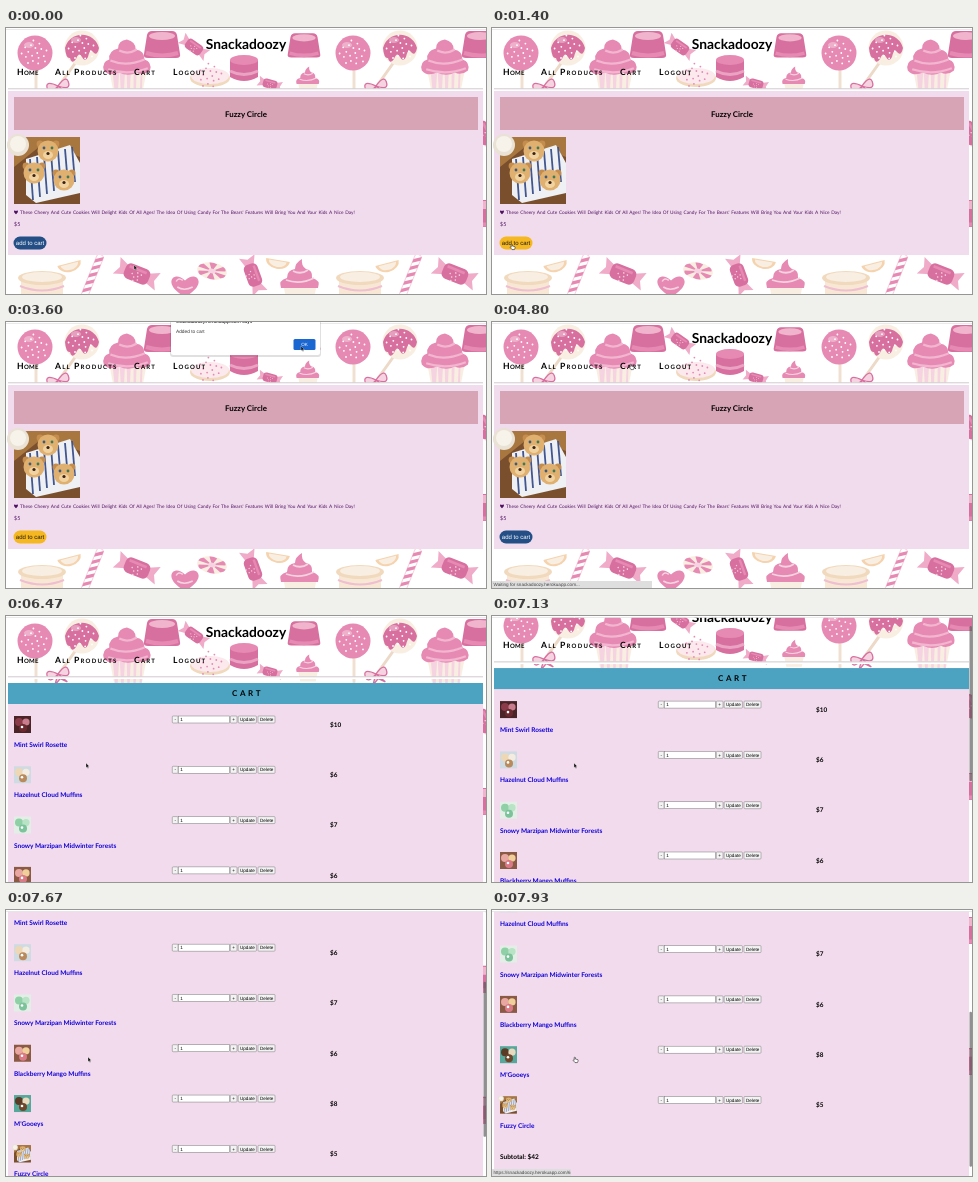
These frames come from a looping animation (480 by 266 pixels, 8 s). An HTML page:

```html
<!DOCTYPE html>
<html lang="en">
<head>
<meta charset="utf-8">
<title>Sweet shop</title>
<style>
html, body { margin: 0; width: 100%; height: 100%; overflow: hidden; background: #fff; }
svg { display: block; width: 480px; height: 266px; }
text { text-rendering: geometricPrecision; white-space: pre; }
.hand { font-family: Lato, sans-serif; font-weight: 700; }
.nav { font-size: 8.6px; font-variant: small-caps; }
.ui { font-family: "Liberation Sans", Arial, sans-serif; }
.body { font-family: Lato, sans-serif; fill: #4f1263; }
</style>
</head>
<body>
<svg id="stage" viewBox="0 0 480 266" xmlns="http://www.w3.org/2000/svg"></svg>
<script>
const stage = document.getElementById('stage');
const PINK = '#e68ab3', DEEP = '#d8709f', PALE = '#f6d3e1', CREAM = '#f9eee2', PEACH = '#f1d9bd', CARD = '#f1dced';
const SITE = 'snackadoozy.herokuapp.com';
const PERIOD = 318;

const rect = (x, y, w, h, fill, more = '') =>
  `<rect x="${x}" y="${y}" width="${w}" height="${h}" fill="${fill}" ${more}/>`;
const circle = (x, y, r, fill) => `<circle cx="${x}" cy="${y}" r="${r}" fill="${fill}"/>`;
const oval = (x, y, rx, ry, fill) => `<ellipse cx="${x}" cy="${y}" rx="${rx}" ry="${ry}" fill="${fill}"/>`;
const path = (d, fill, more = '') => `<path d="${d}" fill="${fill}" ${more}/>`;
const line = (d, color, width = 1) => path(d, 'none', `stroke="${color}" stroke-width="${width}"`);
const at = (x, y, body, rot = 0, scale = 1) =>
  `<g transform="translate(${x} ${y}) rotate(${rot}) scale(${scale})">${body}</g>`;
const text = (x, y, size, cls, str, more = '') =>
  `<text x="${x}" y="${y}" font-size="${size}" class="${cls}" ${more}>${str}</text>`;
const group = (id, body, more = '') => `<g id="${id}" ${more}>${body}</g>`;
const repeat = (n, fn) => Array.from({ length: n }, (_, i) => fn(i)).join('');

// Sweets of the wallpaper, each drawn around its own centre
const dots = (n, r, fill) => repeat(n, i => {
  const a = i * 2.4, d = r * Math.sqrt((i + .5) / n) * .85;
  return circle((Math.cos(a) * d).toFixed(1), (Math.sin(a) * d).toFixed(1), .9, fill);
});
const ball = (fill, speck, drip) => circle(0, 0, 17.5, fill) +
  (drip ? path('M-17 0a17.5 17.5 0 0 1 34 0q-2 9-6 4q-3-4-5 5q-3 6-6 0q-3-6-6 2q-4 6-6-1q-4 1-5-10z', drip) : '') +
  oval(-6, -8, 5, 3, '#ffffff55') + dots(18, 16, speck);
const cupcake = path('M-17 4L-12 30H12L17 4z', CREAM) +
  repeat(5, i => path(`M${-14 + i * 6.4} 4l${2.4 - i * .9} 26h2l${1.6 - i * .2} -26z`, PALE)) +
  path('M-22 4q-2-8 5-10q-1-8 8-10q0-7 8-8q8 2 8 9q8 1 8 9q7 2 5 10q-6 5-12 2q-8 4-16 0q-9 4-14-2z', PINK) +
  line('M-16-5q14 6 31-1M-8-14q8 4 16-1M-18 3q18 6 36-1', '#f3b6d0', 2);
const gum = path('M-18 10l3-19q1-4 5-4h20q4 0 5 4l3 19q1 4-4 4h-28q-5 0-4-4z', DEEP) +
  oval(0, -8, 13, 4, '#f0b4cd') + line('M-16 9q16 5 32 0', PINK, 4);
const drum = path('M-14-8v17q14 8 28 0v-17z', DEEP) + oval(0, -8, 14, 5, PINK) + line('M-14 3q14 7 28 0', '#eaa3c3', 3);
const wrapped = path('M-9-4L-20-9L-17 0L-21 8L-9 4zM9-4L20-9L17 0L21 8L9 4z', '#f0abc8') +
  rect(-12, -7.5, 24, 15, DEEP, 'rx="5"') + line('M-9-4h17', PINK, 2.5) + at(0, 2, dots(7, 8, PALE), 0, .8);
const heart = path('M0 9C-22-3-10-16 0-6C10-16 22-3 0 9z', PINK) + line('M-8-5q2-4 6-1M-7 0q6 4 14 0', PALE, 1.4);
const mint = oval(0, 0, 15, 8.5, CREAM) +
  repeat(6, i => `<g transform="scale(1 .57) rotate(${i * 60})">${path('M0 0L-4-14Q0-16 4-13z', PINK)}</g>`) +
  oval(0, 0, 4, 2.4, PALE);
const bow = path('M0 0Q-12-10-11 1Q-10 7 0 0Q12-10 11 1Q10 7 0 0L7 10L1 5L-6 10z', PALE, `stroke="${DEEP}" stroke-width="1.3"`);
const jar = path('M-21 0v20h42V0z', '#f8e7d4') + oval(0, 0, 24, 7, PEACH) + oval(0, -1, 20, 5, CREAM) +
  line('M-22 8q22 9 44 0', '#eebfd0', 2);
const cane = rect(-3.5, -24, 7, 48, '#fff', `rx="3" stroke="${PALE}"`) +
  repeat(6, i => path(`M-3.5 ${-18 + i * 8}l7-5v4l-7 5z`, PINK));
const slice = path('M-12 0a12 9 0 0 0 24 0z', '#f5d3ae') + path('M-9 1a9 6 0 0 0 18 0z', CREAM);
const meringue = path('M-19 10q-3-8 6-10q0-8 8-9q0-6 7-10q-1 7 4 10q7 1 6 9q9 2 6 10z', PINK) +
  line('M-14 2q14 5 28-2M-7-7q8 4 15-1', PALE, 1.8) + path('M-16 10L-13 26H13L16 10z', CREAM);
const loaf = oval(0, 0, 20, 9, PEACH) + oval(0, -2, 19, 8, '#fbe9ee') + at(0, -2, dots(16, 15, PINK)) ;

const topRow = line('M30 38V90', '#f0e0d2', 3) + line('M70 34L50 62', '#ecd9c8', 3) + at(52, 58, bow, -15) +
  at(29, 25, ball(PINK, '#fff')) + at(76, 20, ball(CREAM, '#fff', DEEP)) +
  at(122, 38, cupcake, 0, 1.1) + at(156, 16, gum) + at(188, 19, wrapped, 35, .75) + at(204, 50, loaf) +
  at(238, 40, drum) + at(298, 17, gum, 0, .9) + at(302, 50, meringue, 0, .6) + at(264, 56, wrapped, 15, .6);
const lowRow = at(36, 250, jar) + at(63, 235, slice, -15) + at(86, 249, cane, 22) + at(131, 246, wrapped, 22, 1.08) +
  at(179, 259, heart, 0, 1.1) + at(206, 243, mint, 10) + at(247, 247, wrapped, 70, .95) + at(272, 232, slice, 10) +
  at(294, 250, meringue);
const tile = topRow + lowRow + at(0, 300, topRow) + at(160, 105, wrapped, 60) + at(160, 185, gum);

// Product pictures
const bear = (x, y) => at(x, y, circle(-8, -7, 3.4, '#c48d4e') + circle(8, -7, 3.4, '#c48d4e') +
  circle(0, 0, 10.5, '#dfb06f') + oval(0, 4, 5, 4, '#f0d3a0') + circle(0, 2.5, 1.6, '#3a2216') +
  circle(-4, -3, 1.4, '#3d5a7a') + circle(4, -3, 1.4, '#3d7a5a'));
const photo = rect(0, 0, 66, 67, '#7a4f2d') + path('M0 0h66v20L30 6L0 30z', '#a8763f') +
  path('M12 22L56 8L66 26V56L22 66L12 58z', '#eef0f4') +
  repeat(7, i => line(`M${16 + i * 7} ${22 - i * 2}l3 ${41 - i}`, '#41558f', 1.8)) +
  circle(4, 8, 11, '#e9e2d5') + circle(4, 7, 8, '#f7f3ea') + bear(34, 14) + bear(20, 36) + bear(50, 43);
const thumb = (bg, a, b, c) => rect(0, 0, 17, 17, bg) + circle(5, 6, 4, a) + circle(12, 6, 3.6, b) +
  circle(9, 12, 4, c) + circle(8, 11, 1.3, '#fff');

const items = [
  ['Mint Swirl Rosette', 10, thumb('#4a2426', '#8b3b4a', '#c97c8e', '#6b2a30')],
  ['Hazelnut Cloud Muffins', 6, thumb('#cfdbe2', '#eed7b4', '#f4ece0', '#b98a5c')],
  ['Snowy Marzipan Midwinter Forests', 7, thumb('#e3efe6', '#8fd0a6', '#b8e3c4', '#7cc29a')],
  ['Blackberry Mango Muffins', 6, thumb('#8b5a45', '#e8a7a0', '#f1cf9a', '#d97a86')],
  ["M'Gooeys", 8, thumb('#56a89a', '#5b3a26', '#e9d9bd', '#6f472c')],
  ['Fuzzy Circle', 5, at(0, 0, photo, 0, .256)]
];

const box = (x, y, w, label, tx) => rect(x, y, w, 7, '#f3f3f3', 'rx=".8" stroke="#777" stroke-width=".5"') +
  text(tx, y + 5.2, 4.6, 'ui', label);
const row = ([name, price, pic], i) => at(0, i * 50.3,
  at(8, 100, pic) + text(8, 131, 6.5, 'hand', name, 'fill="#1100d8"') +
  box(166.3, 100, 5.7, '-', 168.4) + rect(172.3, 100, 51.4, 7, '#fff', 'stroke="#777" stroke-width=".5"') +
  text(174.3, 105.2, 4.6, 'ui', '1') + box(224.3, 100, 6.7, '+', 226.3) +
  box(232.2, 100, 18.2, 'Update', 234) + box(252, 100, 17, 'Delete', 254) +
  text(324, 110.8, 6.4, 'hand', '$' + price));

const nav = [['Home', 11, .3], ['All Products', 49, 1.2], ['Cart', 128, 1.2], ['Logout', 167, 1.1]]
  .map(([s, x, gap]) => text(x, 47, 8.6, 'hand nav', s, `letter-spacing="${gap}"`)).join('');

const product = rect(2, 63, 475, 164, CARD) + rect(8, 69, 464, 33, '#d6a4b5') +
  text(240, 88.6, 7.9, 'hand', 'Fuzzy Circle', 'text-anchor="middle"') + at(8, 109, photo) +
  path('M10 186.2C6.5 183.4 8.4 181.4 10 183C11.6 181.4 13.5 183.4 10 186.2z', '#4f1263') +
  text(14, 186, 4.75, 'body', "These Cheery And Cute Cookies Will Delight Kids Of All Ages! The Idea Of Using Candy For " +
    "The Bears' Features Will Bring You And Your Kids A Nice Day!", 'word-spacing=".6"') +
  text(8, 197.8, 5.4, 'body', '$5') +
  rect(7.5, 208.5, 33, 13, '#234f86', 'rx="6.5" id="pill"') +
  text(24, 217.2, 6, 'ui', 'add to cart', 'text-anchor="middle" id="label"');

const cart = rect(2, 67, 475, 400, '#f2dbed') + rect(2, 67, 475, 21, '#4ba3c1') +
  text(226, 80.2, 8, 'hand', 'CART', 'letter-spacing="2.6"') + items.map(row).join('') +
  text(8, 414.3, 6.5, 'hand', 'Subtotal: $42');

const alertBox = rect(164, -4, 151, 39, '#000', 'rx="3" opacity=".12"') + rect(165, -5, 149, 38, '#fff', 'rx="2.5"') +
  text(170, 1.2, 5, 'ui', SITE + ' says') + text(170, 10.6, 4.8, 'ui', 'Added to cart', 'fill="#333"') +
  rect(287.5, 17, 22, 11, '#1b67d2', 'rx="1.5"') +
  text(298.5, 24.3, 4.6, 'ui', 'OK', 'fill="#fff" text-anchor="middle"');

const arrow = path('M0 0V4.8L1.1 3.8L1.9 5.5L2.7 5.1L1.9 3.5H3.4z', '#111', 'stroke="#fff" stroke-width=".3"');
const hand = path('M.2.4Q.9-.4 1.3.5V2L3.8 2.6Q4.3 3 4 4.2L3.4 5.6H1L-.8 3.4Q-.6 2.6.2 3.2z', '#fff',
  'stroke="#111" stroke-width=".55"');

stage.innerHTML = rect(0, 0, 480, 266, '#fff') +
  group('page',
    [-PERIOD, 0, PERIOD].map(x => at(x, 0, tile)).join('') +
    rect(2, 60.5, 475, 2.5, '#fff') + rect(2, 60.3, 475, 1, '#cfc9cd') +
    text(240, 20.6, 13.8, 'hand', 'Snackadoozy', 'text-anchor="middle"') + nav +
    group('product', product) + group('cart', cart)) +
  rect(0, 0, 480, 1.6, '#fff') + rect(0, 1, 480, .6, '#dcdcdc') +
  rect(477.5, 1, 2.5, 155, '#555', 'rx="1.2" opacity=".65" id="thumb"') +
  group('alert', alertBox) +
  group('status', rect(0, 259, 80, 7, '#dedede', 'id="bar"') + text(1.5, 264.2, 4.6, 'ui', '', 'fill="#444" id="url"')) +
  group('cursor', group('arrow', arrow) + group('hand', hand));

const el = id => document.getElementById(id);
const show = (id, on) => el(id).setAttribute('display', on ? 'inline' : 'none');
const set = (id, key, val) => el(id).setAttribute(key, val);
const smooth = u => u * u * (3 - 2 * u);

// Value at time t from keys [time, ...values]
function track(keys, t, ease = u => u) {
  const n = keys.findIndex(k => k[0] > t);
  if (n < 0) return keys[keys.length - 1].slice(1);
  if (n === 0) return keys[0].slice(1);
  const a = keys[n - 1], b = keys[n], u = ease((t - a[0]) / (b[0] - a[0]));
  return a.slice(1).map((v, i) => v + (b[i + 1] - v) * u);
}

const moves = [[270, 128, 237], [1130, 19, 216], [2600, 19, 216], [3470, 295, 24], [3670, 295, 24],
  [4400, 138, 42], [5200, 138, 42], [5530, 136, 47], [5670, 136, 47], [6130, 80, 147], [7000, 80, 147], [7140, 82, 147]];
const scroll = [[7050, 0], [7270, 41], [7930, 165]];

function mix(a, b, u) {
  return `rgb(${a.map((v, i) => Math.round(v + (b[i] - v) * u)).join()})`;
}

function statusText(t) {
  if (t >= 4400 && t < 4670 || t >= 5070 && t < 5800) return `https://${SITE}/cart`;
  if (t >= 4670 && t < 5070) return `Waiting for ${SITE}...`;
  return t >= 7790 ? `https://${SITE}/6` : '';
}

function draw(ms) {
  // The picture holds for a fifteenth of a second
  const step = Math.min(119, Math.floor((ms + 5) * 3 / 200));
  const t = Math.round(step * 20 / 3) * 10;
  const inCart = t >= 5000;
  const [top] = track(scroll, t);
  const [x, y] = track(moves, t, smooth);
  const [glow] = track([[1060, 0], [1330, 1], [3600, 1], [3870, 0]], t);
  const status = statusText(t);
  const pointing = t >= 1060 && t < 2730 || t >= 4330 && t < 5730 || t >= 7790;

  set('page', 'transform', `translate(0 ${-top})`);
  show('product', !inCart);
  show('cart', inCart);
  set('pill', 'fill', mix([35, 79, 134], [246, 184, 32], glow));
  set('label', 'fill', mix([255, 255, 255], [30, 25, 20], glow));
  show('alert', t >= 2270 && t < 3670);
  show('thumb', t >= 7070);
  set('thumb', 'y', 1 + top * .61);
  show('status', status);
  set('bar', 'width', status[0] === 'W' ? 160 : 79);
  el('url').textContent = status;
  set('cursor', 'transform', `translate(${x} ${y})`);
  show('hand', pointing);
  show('arrow', !pointing);
}

const start = performance.now();
function tick() {
  draw((performance.now() - start) % 8000);
  requestAnimationFrame(tick);
}
tick();
</script>
</body>
</html>
```
